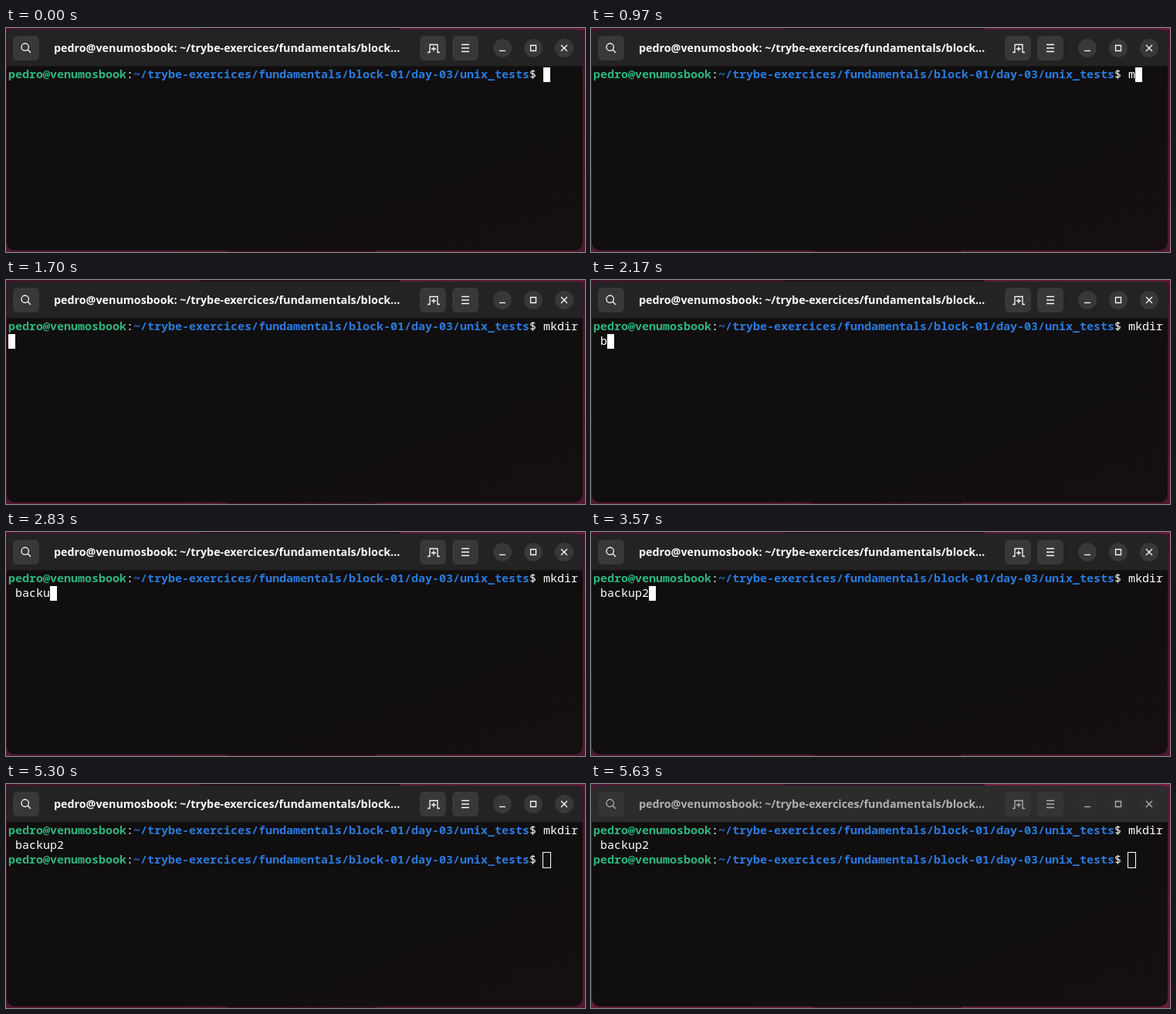
Recreate the animation shown at these times as an HTML page. Size 750 by 290 pixels, loop 6100 ms.

```html
<!DOCTYPE html>
<html lang="en">
<head>
<meta charset="utf-8">
<title>Terminal</title>
<style>
  html, body { margin: 0; width: 100%; height: 100%; overflow: hidden; background: #4a1a32; }
  svg { display: block; width: 750px; height: 290px; }
  text { white-space: pre; }
  .term { font: 15px "Noto Sans Mono", monospace; fill: #fff; }
  .term tspan { font-weight: 700; }
  .user { fill: #2eb67d; }
  .path { fill: #2a7bde; }
  #title { font: 700 14.3px "Open Sans", sans-serif; }
  #icons path, #icons circle { fill: none; stroke: currentColor; stroke-width: 1.3; }
</style>
</head>
<body>
<svg viewBox="0 0 750 290">
  <defs>
    <linearGradient id="wall" x2="0" y2="1">
      <stop offset="0" stop-color="#561b38"/>
      <stop offset="1" stop-color="#68203f"/>
    </linearGradient>
    <linearGradient id="glass" x2="1" y2="1">
      <stop offset=".6" stop-color="#100e0e"/>
      <stop offset="1" stop-color="#15100f"/>
    </linearGradient>
    <clipPath id="frame"><rect x="1" y="2" width="746" height="286" rx="10"/></clipPath>
  </defs>

  <rect width="750" height="290" fill="url(#wall)"/>
  <path d="M250 0H510V3H250Z" fill="#35122a"/>
  <path d="M510 0H750V3H510Z" fill="#7a2346"/>
  <path d="M278 287H480V290H292Z" fill="#3d1429"/>
  <rect id="shade" width="750" height="290"/>

  <g clip-path="url(#frame)">
    <rect y="2" width="750" height="288" fill="url(#glass)"/>
    <rect id="bar" y="2" width="750" height="47"/>
    <path d="M0 49.5H750" stroke="#171717"/>
  </g>
  <g id="boxes">
    <rect x="9" y="10" width="34" height="32" rx="6"/>
    <rect x="536" y="10" width="34" height="32" rx="6"/>
    <rect x="578" y="10" width="34" height="32" rx="6"/>
  </g>
  <g id="rounds">
    <circle cx="643" cy="26" r="12"/>
    <circle cx="683" cy="26" r="12"/>
    <circle cx="723" cy="26" r="12"/>
  </g>
  <g id="icons">
    <circle cx="24.7" cy="24.7" r="4.7"/>
    <path d="M28 28L32 32"/>
    <path d="M546 31.5H549V21.5H559V31.5H562M554 24V30M551 27H557"/>
    <path d="M590 21.5H600M590 26H600M590 30.5H600"/>
    <path d="M639 29.5H647"/>
    <path d="M679.5 22.5H686.5V29.5H679.5Z"/>
    <path d="M719 22L727 30M727 22L719 30"/>
  </g>
  <text id="title" x="62" y="31">pedro@venumosbook: ~/trybe-exercices/fundamentals/block…</text>

  <g class="term">
    <text id="row0" x="3" y="65"></text>
    <text id="row1" x="3" y="84"></text>
    <text id="row2" x="3" y="103"></text>
  </g>
  <rect id="cursor"/>
</svg>
<script>
const $ = id => document.getElementById(id);
const LOOP = 6100, ENTER = 3830, BLUR = 5300;
const COLS = 82, START = 77, CELL = 9, LINE = 19;
const command = "mkdir backup2";
const keys = [970, 1100, 1430, 1570, 1700, 1900, 2170, 2300, 2570, 2630, 2830, 3300, 3570];
const prompt = '<tspan class="user">pedro@venumosbook</tspan>:' +
  '<tspan class="path">~/trybe-exercices/fundamentals/block-01/day-03/unix_tests</tspan>$ ';

const mix = (a, b, p) => a + (b - a) * p;
const gray = (a, b, p) => `rgb(${Array(3).fill(Math.round(mix(a, b, p)))})`;

function setRect(el, x, y, width, height) {
  for (const [k, v] of Object.entries({ x, y, width, height })) el.setAttribute(k, v);
}

function drawCursor(cell, hollow) {
  const x = 3 + cell % COLS * CELL, y = 51 + Math.floor(cell / COLS) * LINE;
  const c = $("cursor");
  if (hollow) setRect(c, x - .5, y - .5, CELL + 1, LINE + 1);
  else setRect(c, x, y, CELL, LINE);
  c.setAttribute("fill", hollow ? "none" : "#fff");
  c.setAttribute("stroke", hollow ? "#fff" : "none");
}

// The header dims in a few steps once the window loses focus.
function drawHeader(p) {
  $("bar").setAttribute("fill", gray(35, 44, p));
  $("boxes").setAttribute("fill", gray(56, 52, p));
  $("rounds").setAttribute("fill", gray(56, 46, p));
  $("icons").style.color = gray(250, 176, p);
  $("title").setAttribute("fill", gray(250, 176, p));
  $("shade").setAttribute("opacity", mix(.22, .06, p));
}

let shown = "";
function draw(now) {
  const t = now % LOOP;
  const typed = keys.filter(k => k <= t).length;
  const done = t >= ENTER, blurred = t >= BLUR;
  const step = blurred ? Math.min(5, Math.floor((t - BLUR) / 66)) : 0;
  const state = [typed, done, blurred, step].join();
  if (state !== shown) {
    shown = state;
    const text = command.slice(0, typed), room = COLS - START;
    $("row0").innerHTML = prompt + text.slice(0, room);
    $("row1").textContent = text.slice(room);
    $("row2").innerHTML = done ? prompt : "";
    drawCursor(done ? 2 * COLS + START : START + typed, blurred);
    drawHeader(1 - (1 - step / 5) ** 2);
  }
  requestAnimationFrame(draw);
}
draw(0);
</script>
</body>
</html>
```
